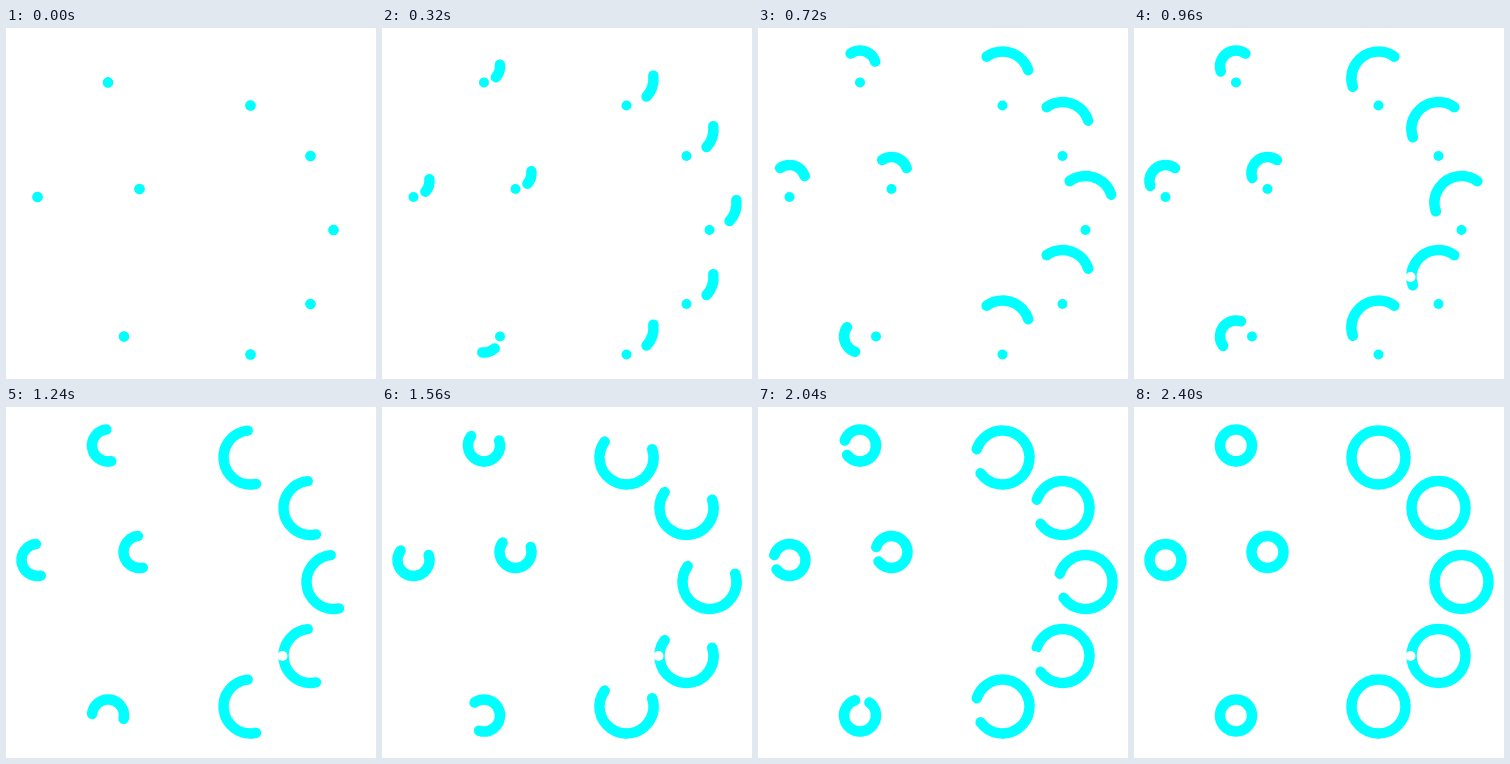
An HTML page that plays this animation: 370 by 351 pixels, repeating every 2440 ms.

```html
<!DOCTYPE html>
<html lang="en">
<head>
<meta charset="utf-8">
<title>Rings</title>
<style>
  html, body { margin: 0; height: 100%; overflow: hidden; background: #fff; }
  svg { display: block; shape-rendering: geometricPrecision; }
  .dot { fill: #0ff; }
  .arc { fill: none; stroke: #0ff; stroke-width: 10.5; stroke-linecap: round; }
</style>
</head>
<body>
<svg width="370" height="351" viewBox="0 0 370 351">
  <g id="rings"></g>
  <circle cx="276.5" cy="249" r="5" fill="#fff"/>
</svg>
<script>
const STEP = 40, STEPS = 61;
const COUNTER = 'rotate(90) scale(1 -1)'; // starts at the bottom, runs counterclockwise

// x, y, radius, orientation
const rings = [
  [244.5, 50.5, 27, COUNTER],
  [304.5, 101, 27, COUNTER],
  [327.5, 175, 27, COUNTER],
  [304.5, 249, 27, COUNTER],
  [244.5, 299.5, 27, COUNTER],
  [102, 38.5, 16, COUNTER],
  [31.5, 153, 16, COUNTER],
  [133.5, 145, 16, COUNTER],
  [102, 308.5, 16, '']
];

document.getElementById('rings').innerHTML = rings.map(([x, y, r, turn]) =>
  `<g transform="translate(${x} ${y}) ${turn}">
    <circle class="dot" cx="${r}" r="5"/>
    <circle class="arc" r="${r}" pathLength="360"/>
  </g>`).join('');

const arcs = document.querySelectorAll('.arc');

// The head runs twice as fast as the tail, so the arc's length equals the tail angle.
function draw(now) {
  const tail = 6 * (Math.floor(now / STEP) % STEPS);
  for (const arc of arcs) {
    arc.setAttribute('transform', `rotate(${tail})`);
    arc.setAttribute('stroke-dasharray', `${tail} 360`);
  }
}

const start = performance.now();
function tick() {
  draw(performance.now() - start);
  requestAnimationFrame(tick);
}
tick();
</script>
</body>
</html>
```
